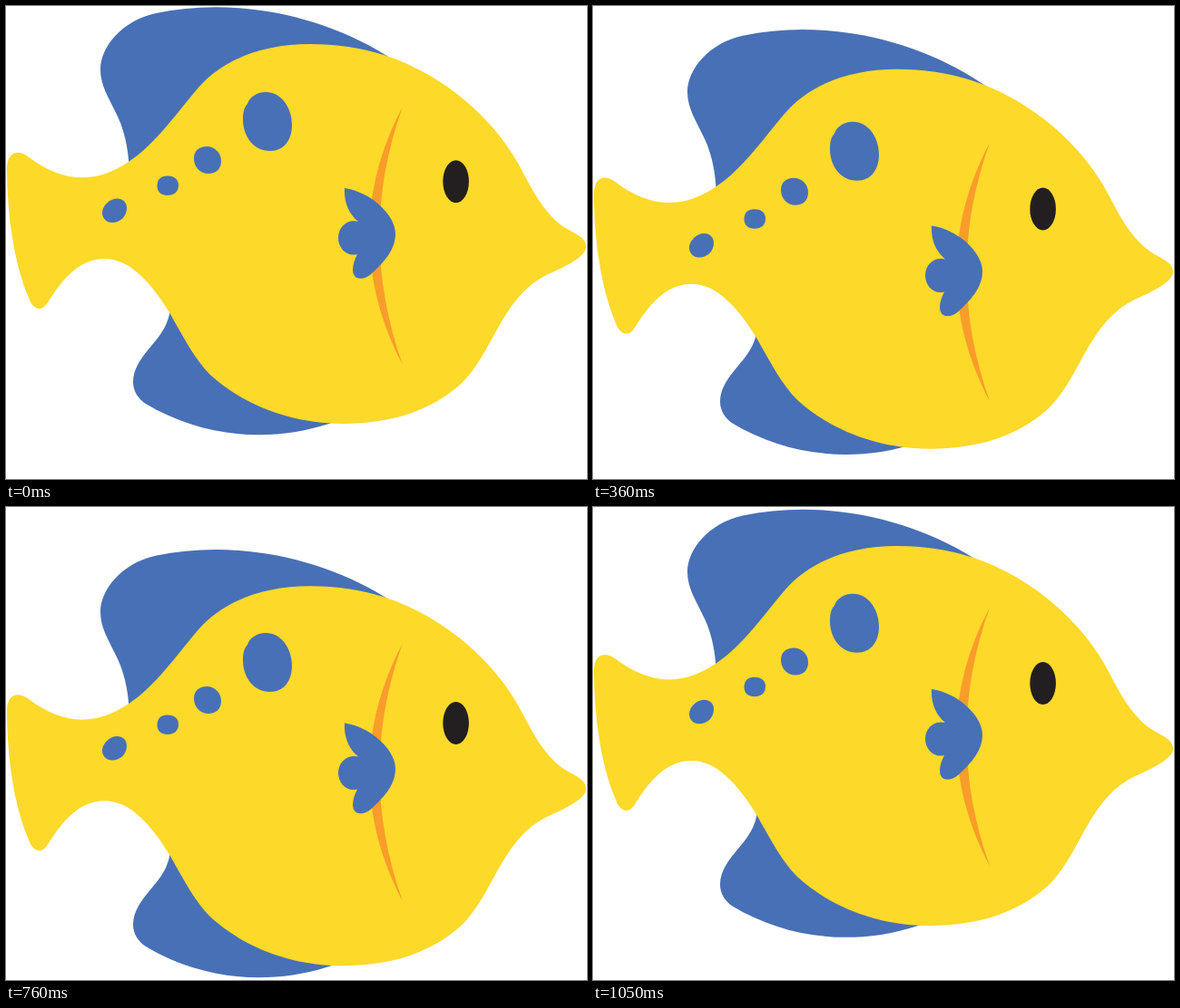
Write an HTML page that moves like this. It is 640 px wide and 522 px high and loops after 1.09 s.

```html
<!DOCTYPE html>
<html lang="en">
<head>
<meta charset="utf-8">
<title>Bobbing fish</title>
<style>
  html, body { margin: 0; width: 100%; height: 100%; overflow: hidden; background: #fff; }
  svg { display: block; width: 640px; height: 522px; }
  .blue { fill: #4870b6; }
  .yellow { fill: #fdd92a; }
  .orange { fill: #f99d2a; }
  .black { fill: #231f20; }
</style>
</head>
<body>
<!-- data-lag: place of each part in the stagger -->
<svg viewBox="0 0 640 522">
  <path class="blue" data-lag="8" d="M136 190C136 165 132 141 123 122C113 101 104 88 104 70C104 45 128 16 165 8C250 -10 345 9 418 54L440 68L300 200Z"/>
  <path class="blue" data-lag="9" d="M182 325C181 349 172 361 161 374C149 388 140 400 140 415C140 425 146 434 154 439C214 475 288 483 356 461L390 449L300 380Z"/>
  <path class="yellow" data-lag="7" d="M1 180C1 163 11 157 24 166C62 195 98 197 135 172C165 152 188 118 212 90C240 58 284 42 335 42C364 42 391 46 416 54C478 74 532 119 562 170C577 196 590 229 618 246C631 253 639 257 639 266C639 277 613 289 597 296C545 321 537 384 500 418C467 447 424 461 371 461C315 461 262 441 225 407C209 391 196 367 181 340C160 305 136 279 109 279C83 279 66 297 50 321C45 329 42 334 37 334C31 334 27 328 25 322C9 285 1 230 1 180Z"/>
  <path class="orange" data-lag="1" d="M437 111C388 203 388 303 437 396C403 300 403 206 437 111Z"/>
  <path class="blue" data-lag="0" d="M373 201C402 205 429 231 429 251C429 270 415 284 402 296C394 303 382 303 382 291C382 285 384 280 387 274C375 277 366 267 366 256C366 243 377 235 388 238C377 229 372 215 373 201Z"/>
  <path class="blue" data-lag="5" d="M286 95C304 95 315 113 315 131C315 148 306 160 291 160C273 160 261 144 261 125C261 116 263 111 266 108C268 101 276 95 286 95Z"/>
  <path class="blue" data-lag="4" d="M221 155C230 155 237 162 237 171C237 180 231 185 223 185C214 185 207 178 207 168C207 160 213 155 221 155Z"/>
  <path class="blue" data-lag="3" d="M178 187.500C186 187.500 190 192 190 198C190 205 185 209 178 209C171 209 166.500 205 166.500 198.500C166.500 192 170 187.500 178 187.500Z"/>
  <path class="blue" data-lag="2" d="M122 212.500C129 212.500 133 217 133 223C133 232 126 239 117 239C110 239 106 234 106 228C106 221 114 212.500 122 212.500Z"/>
  <ellipse class="black" data-lag="6" cx="495.600" cy="193.700" rx="14.300" ry="23.500" transform-origin="0 0"/>
</svg>
<script>
  const LOOP = 1090, HALF = LOOP / 2, STEPS = 33, STEP = LOOP / STEPS;
  const DROP = 49, STAGGER = 10.5;
  const parts = [...document.querySelectorAll('[data-lag]')];

  const ease = p => p < 0.5 ? 4 * p ** 3 : 1 - 4 * (1 - p) ** 3;

  // Eased descent in the first half of the loop, eased rise in the second.
  function depth(time, lag) {
    const t = (time - lag * STAGGER + LOOP) % LOOP;
    return DROP * (t < HALF ? ease(t / HALF) : 1 - ease(t / HALF - 1));
  }

  function draw(now) {
    const step = Math.min(STEPS - 1, Math.floor((now % LOOP + 8) / STEP));
    const time = step && step * STEP - 3;
    for (const part of parts) {
      const lag = +part.dataset.lag;
      const y = depth(time, lag) - depth(0, lag);
      part.setAttribute('transform', `translate(0 ${y.toFixed(2)})`);
    }
  }

  const start = performance.now();
  function tick() {
    draw(performance.now() - start);
    requestAnimationFrame(tick);
  }
  tick();
</script>
</body>
</html>
```
